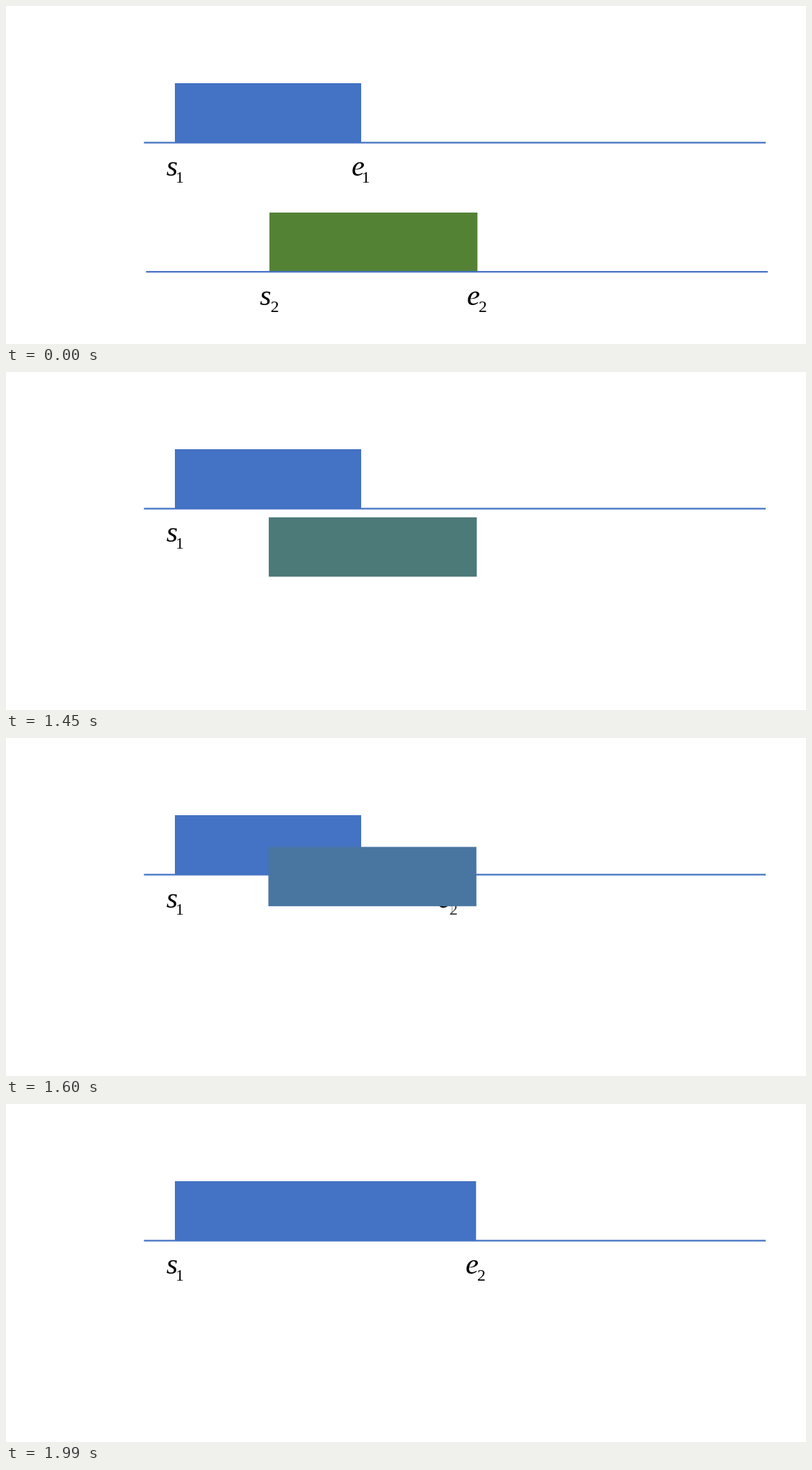
Write an HTML page with a canvas that moves like this. It is 1151x486 px and loops after 2.84 s.

```html
<!DOCTYPE html>
<html lang="en">
<head>
<meta charset="utf-8">
<title>Merging intervals</title>
<style>
  html, body { margin: 0; width: 100%; height: 100%; overflow: hidden; background: #fff; }
  canvas { display: block; }
</style>
</head>
<body>
<canvas id="stage" width="1151" height="486"></canvas>
<script>
const ctx = document.getElementById('stage').getContext('2d');
const LOOP = 2840;
const BLUE = [68, 114, 196];
const GREEN = [84, 130, 53];

// The merge advances in held steps: start time, eased progress.
const STEPS = [
  [0, 0], [1300, 0.073], [1370, 0.263], [1450, 0.473], [1530, 0.624], [1600, 0.755],
  [1680, 0.86], [1750, 0.925], [1830, 0.966], [1910, 0.991], [1990, 1]
];

const lerp = (a, b, p) => a + (b - a) * p;
const rgb = c => `rgb(${c.map(Math.round).join(',')})`;
const progressAt = t => STEPS.filter(([start]) => start <= t).pop()[1];

function box(x, y, w, h, color) {
  ctx.fillStyle = rgb(color);
  ctx.fillRect(x, y, w, h);
}

function axis(x, y) {
  box(x, y - 1.15, 894.5, 2.3, BLUE);
}

function write(text, x, y, font, alpha = 1) {
  ctx.save();
  ctx.globalAlpha *= alpha;
  ctx.fillStyle = '#000';
  ctx.font = `${font} "Liberation Serif", "Times New Roman", serif`;
  ctx.fillText(text, x, y);
  ctx.restore();
}

const letter = (text, x, y) => write(text, x, y, 'italic 42px');
const subscript = (text, x, y, alpha) => write(text, x, y + 9.5, '24px', alpha);

function draw(t) {
  const p = progressAt(t);
  ctx.fillStyle = '#fff';
  ctx.fillRect(0, 0, 1151, 486);

  box(243, 111, 268, 85.5, BLUE);
  axis(198.5, 196.5);
  letter('s', 230.7, 244);
  subscript('1', 244, 244);

  // The end label slides right while its index changes from 1 to 2.
  const endX = lerp(497.2, 661.3, p);
  letter('e', endX, 244);
  subscript('1', endX + 14.5, 244, 1 - p);
  subscript('2', endX + 16.8, 244, p);

  const color = GREEN.map((c, i) => lerp(c, BLUE[i], p));
  box(lerp(379, 377, p), lerp(297, 111, p), 299.3, 85.3, color);

  // The second row fades out early in the move.
  const fade = p === 0 ? 1 : Math.max(0, Math.min(1, 1.02 - p * 3.04));
  ctx.globalAlpha = fade;
  axis(201.5, 382.2);
  letter('s', 365.2, 430);
  subscript('2', 380.8, 430);
  letter('e', 663.2, 430);
  subscript('2', 680, 430);
  ctx.globalAlpha = 1;
}

function tick() {
  draw(performance.now() % LOOP);
  requestAnimationFrame(tick);
}
tick();
</script>
</body>
</html>
```
